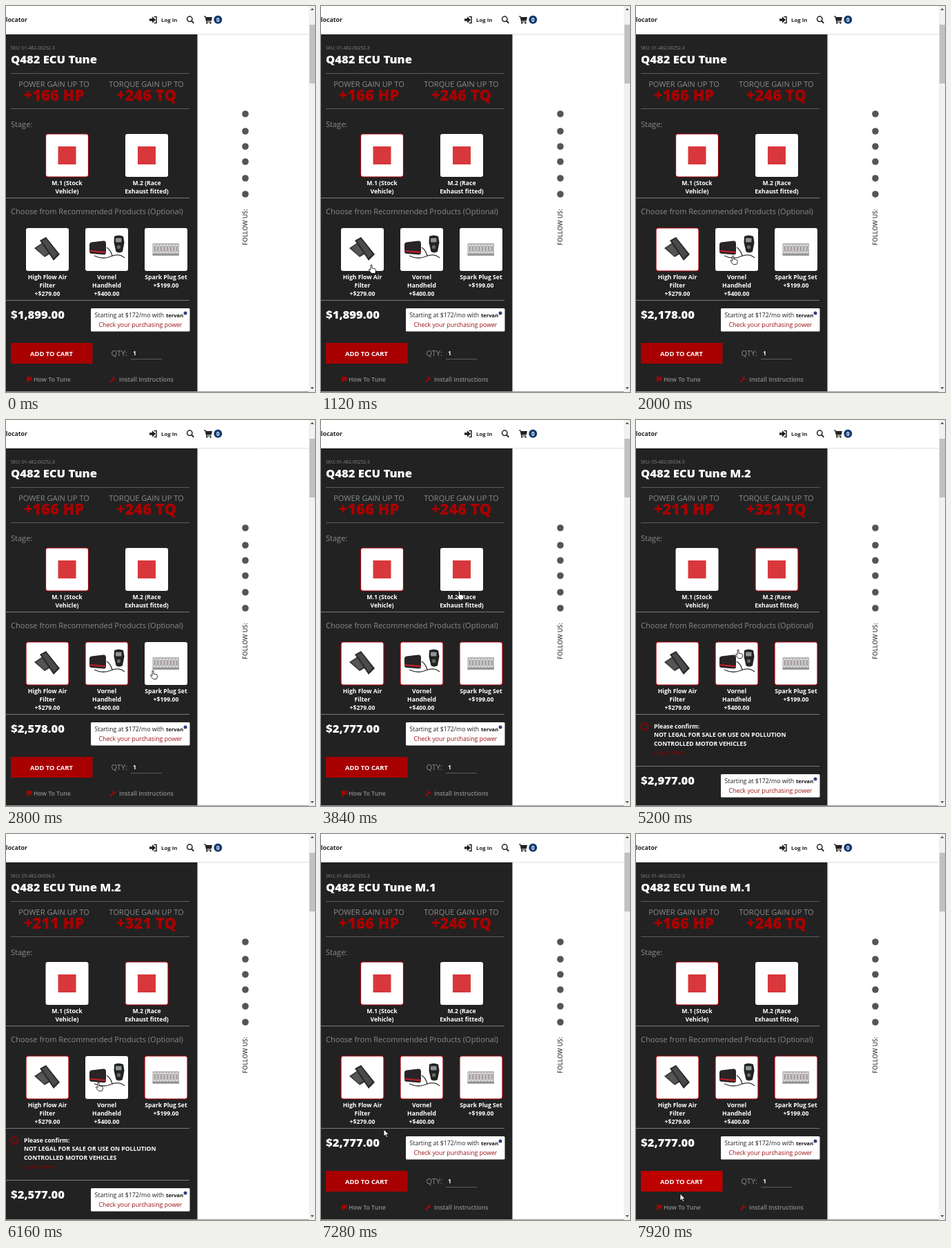
Recreate the animation shown at these times as an HTML page. Size 448 by 558 pixels, loop 8000 ms.

```html
<!DOCTYPE html>
<html lang="en">
<head>
<meta charset="utf-8">
<title>Tune configurator</title>
<style>
  html, body { margin: 0; width: 100%; height: 100%; overflow: hidden; background: #fff; }
  svg { display: block; width: 448px; height: 558px; font-family: "Open Sans", sans-serif; }
  .b { font-weight: 700; font-size: 8.65px; fill: #fff; }
  .h { font-weight: 800; font-size: 16.6px; fill: #fff; }
  .g { font-size: 11.05px; fill: #8b8b8b; }
  .big { font-weight: 800; font-size: 22px; fill: #a80000; }
  .s { font-weight: 600; font-size: 8.75px; fill: #8b8b8b; }
  .pay { font-size: 8.75px; fill: #222; }
  .m { text-anchor: middle; }
  .rule { fill: #5c5c5c; }
  .edge { fill: #7a7a7a; }
  .tile { fill: #fff; stroke-width: 1.2; }
</style>
</head>
<body>
<svg viewBox="0 0 448 558" xmlns="http://www.w3.org/2000/svg">
  <defs>
    <clipPath id="clip"><rect y="41" width="277.500" height="516"/></clipPath>
    <linearGradient id="shade" x2="0" y2="1">
      <stop stop-color="#e6e6e6"/><stop offset="1" stop-color="#fff"/>
    </linearGradient>
  </defs>
  <rect width="448" height="558" fill="#fff"/>
  <rect x="277" y="40" width="162" height="3" fill="url(#shade)"/>

  <g fill="#222">
    <text x="31" y="22.500" text-anchor="end" font-size="8.800" font-weight="700">Dealer locator</text>
    <text x="225" y="22.500" font-size="7.800" font-weight="700">Log In</text>
    <path d="M208 18.200h4v-3l5 4.800-5 4.800v-3h-4z"/>
    <path d="M214.500 15.500h3.500v9h-3.500" fill="none" stroke="#222" stroke-width="1.500"/>
    <circle cx="266.300" cy="18.800" r="3.700" fill="none" stroke="#222" stroke-width="1.500"/>
    <path d="M269 21.500l3.300 3.300" stroke="#222" stroke-width="1.800"/>
    <path d="M287 14.500h2.600l.4 1.500h9l-1.200 5.500h-6.500l.2 1h6v1h-7.200l-1.700-7.800h-1.600z"/>
    <circle cx="291.300" cy="24.600" r="1.200"/><circle cx="296.500" cy="24.600" r="1.200"/>
    <circle cx="307.300" cy="19.800" r="6" fill="#123a72"/>
    <text class="m" x="307.300" y="22.800" font-size="8" font-weight="700" style="fill:#fff">0</text>
  </g>

  <g clip-path="url(#clip)">
    <rect y="41" width="278" height="516" fill="#222"/>
    <text id="sku" x="7" y="62.500" font-size="6.600" fill="#858585"></text>
    <text id="title" class="h" x="7" y="82.700"></text>
    <rect class="rule" x="7" y="97" width="259" height="1"/>
    <text class="g m" x="69.500" y="116.500">POWER GAIN UP TO</text>
    <text class="g m" x="203.500" y="116.500">TORQUE GAIN UP TO</text>
    <text id="hp" class="big m" x="69.500" y="136.800"></text>
    <text id="tq" class="big m" x="203.500" y="136.800"></text>
    <rect class="rule" x="7" y="148" width="259" height="1"/>
    <text class="g" x="7" y="175">Stage:</text>
    <rect class="edge" y="277" width="266" height="1"/>
    <text class="g" x="7" y="301">Choose from Recommended Products (Optional)</text>
    <g id="tiles"></g>

    <g id="photos">
      <path d="M41 350l12-8 13 15-10 6z" fill="#383838"/>
      <path d="M44 350l9-6 10 12-8 5z" fill="#555"/>
      <path d="M49 339l9-5 20 25-9 9z" fill="#2a2a2a"/>
      <path d="M52 339.500l6-3 17 22-6 6z" fill="#4a4a4a"/>
      <path d="M121 345q0-3 3-3.500l17-2q4-.3 4 4v13q0 3-3 3l-18-1.500q-3-.3-3-3z" fill="#292426"/>
      <path d="M121 353l24 2v2.500l-24-2.500z" fill="#b91f2a"/>
      <path d="M128 361q12 6 24 1t20 2M146 349q6 4 8 12" fill="none" stroke="#333" stroke-width="1.300"/>
      <path d="M157 333q6-3 13 0l1.500 9-2.500 13q-5 3-9.500 0l-3-13z" fill="#222"/>
      <rect x="159" y="335.500" width="8.500" height="6" rx="1" fill="#8d9596"/>
      <circle cx="163.500" cy="348.500" r="2.700" fill="#666"/>
      <rect x="212.500" y="343" width="38.500" height="18" rx="1" fill="#b4b4b4"/>
      <rect x="212.500" y="358.500" width="38.500" height="2" fill="#8c8c8c"/>
      <g id="plugs"></g>
    </g>

    <rect class="edge" y="425" width="266" height="1"/>
    <g id="confirm">
      <circle cx="12.300" cy="443.200" r="5" fill="none" stroke="#920000" stroke-width="2"/>
      <text class="b" x="26" y="446">Please confirm:</text>
      <text class="b" x="26" y="458.300">NOT LEGAL FOR SALE OR USE ON POLLUTION</text>
      <text class="b" x="26" y="470.500">CONTROLLED MOTOR VEHICLES</text>
      <text x="26" y="483.500" font-size="8" font-weight="600" fill="#720808">Learn More</text>
      <rect class="edge" y="500" width="266" height="1"/>
    </g>

    <g id="buy">
      <text id="price" class="h" x="7" y="451.700"></text>
      <rect x="123" y="437" width="143.500" height="33.500" rx="1.500" fill="#fff"/>
      <text class="pay" x="128.500" y="450">Starting at $172/mo with</text>
      <text x="232" y="450" font-size="7.600" font-weight="700" fill="#111">tervan</text>
      <circle cx="260" cy="444" r="2.500" fill="#2f3f7d"/>
      <text class="pay m" x="195" y="463.500" style="fill:#9c1212">Check your purchasing power</text>
      <rect id="add" x="7" y="487" width="118.500" height="30"/>
      <text class="m" x="66" y="505.500" font-size="9.350" font-weight="700" fill="#fff">ADD TO CART</text>
      <text class="g" x="152.500" y="506">QTY:</text>
      <text class="b" x="184" y="505">1</text>
      <rect class="rule" x="181" y="510" width="45" height="1"/>
      <path d="M30 536h7.500v5.500h-5v2H30z" fill="#9c0808"/>
      <text class="s" x="40" y="543">How To Tune</text>
      <path d="M152 543l4-4" stroke="#9c0808" stroke-width="2" stroke-linecap="round"/>
      <path d="M157.500 535.500a2.500 2.500 0 1 0 2 2.500l-2 .7-1-1z" fill="#9c0808"/>
      <text class="s" x="164" y="543">Install Instructions</text>
    </g>
  </g>
  <rect y="557" width="439" height="1" fill="#999"/>

  <g id="social" fill="#555"></g>
  <text transform="translate(349.500 346) rotate(-90)" font-size="8.900" font-weight="600" fill="#444">FOLLOW US:</text>

  <rect x="439" width="9" height="558" fill="#f1f1f1"/>
  <rect x="440" y="27" width="8" height="85" fill="#c1c1c1"/>
  <path d="M441.500 6l2.500-3 2.500 3zM441.500 551l2.500 3 2.500-3z" fill="#505050"/>

  <g id="cursor" fill="#fff" stroke="#000" stroke-width=".8" stroke-linejoin="round">
    <path id="arrow" d="M0 0v10l2.300-2.100 1.700 3.900 1.700-.8-1.700-3.700h3.200z"/>
    <path id="hand" d="M-1 1q0-1 1-1t1 1v4l4 .8q1.500.4 1.400 2L6 11.500q-.2 1-1.200 1H.7q-.7 0-1.100-.6L-3.300 8q-.7-1.200.3-1.500.8-.2 2 1.200z"/>
  </g>
</svg>
<script>
  const $ = id => document.getElementById(id);
  const LOOP = 8000, STEP = 80;

  // [left, top, label lines, first baseline]
  const tiles = [
    [57.5, 185, ["M.1 (Stock", "Vehicle)"], 259],
    [173, 185, ["M.2 (Race", "Exhaust fitted)"], 259],
    [29, 321, ["High Flow Air", "Filter", "+$279.00"], 395],
    [115, 321, ["Vornel", "Handheld", "+$400.00"], 395],
    [201, 321, ["Spark Plug Set", "+$199.00"], 395]
  ];
  $("tiles").innerHTML = tiles.map(([x, y, lines, base], i) =>
    `<rect id="tile${i}" class="tile" x="${x}" y="${y}" width="62" height="62" rx="3"/>` +
    (i < 2 ? `<rect x="${x + 18}" y="${y + 18}" width="26" height="26" fill="#d8383c"/>` : "") +
    lines.map((s, n) =>
      `<text class="b m" x="${x + 31}" y="${base + n * 12.2}">${s}</text>`).join("")
  ).join("");

  $("plugs").innerHTML = Array.from({ length: 8 }, (_, i) =>
    `<rect x="${214 + i * 4.6}" y="345" width="3.200" height="12" fill="#dedede"/>` +
    `<rect x="${215 + i * 4.6}" y="347" width="1.300" height="8" fill="#8a7878"/>`).join("");

  $("social").innerHTML = [156, 181, 203, 225, 249, 272].map(y =>
    `<circle cx="347" cy="${y}" r="4.800"/>`).join("");

  // cursor tip: [time, x, y]
  const path = [
    [0, -14, 300], [80, -14, 300], [560, 44, 354], [720, 48, 357], [800, 48, 357],
    [1120, 73, 374], [1600, 73, 374], [2080, 146, 360], [2320, 146, 360],
    [2800, 213, 362], [3200, 213, 362], [4000, 199, 234], [4640, 199, 234],
    [5440, 134, 359], [6320, 134, 359], [6720, 92, 222], [6880, 92, 222],
    [7280, 91, 427], [7520, 78, 503], [7600, 78, 503], [7920, 64, 520]
  ];
  // [time, stage, filter, handheld, plugs]
  const picks = [
    [0, 1, 0, 0, 0], [1600, 1, 1, 0, 0], [2320, 1, 1, 1, 0], [3200, 1, 1, 1, 1],
    [4080, 2, 1, 1, 1], [5600, 2, 1, 0, 1], [6320, 2, 1, 1, 1], [6800, 1, 1, 1, 1]
  ];
  const stages = {
    1: { sku: "01-482-00252-3", hp: 166, tq: 246, cost: 1899 },
    2: { sku: "05-482-00034-5", hp: 211, tq: 321, cost: 2099 }
  };

  const last = (rows, t) => rows.findLast(r => r[0] <= t);
  const put = (id, s) => { if ($(id).textContent !== s) $(id).textContent = s; };
  const ease = u => u * u * (3 - 2 * u);

  function tip(t) {
    const a = last(path, t), b = path[path.indexOf(a) + 1] || a;
    const u = a === b ? 0 : ease((t - a[0]) / (b[0] - a[0]));
    return [a[1] + (b[1] - a[1]) * u, a[2] + (b[2] - a[2]) * u];
  }

  const inside = (x, y, l, t, w, h) => x >= l && x <= l + w && y >= t && y <= t + h;

  function draw(t) {
    const [, stage, filter, handheld, plugs] = last(picks, t);
    const s = stages[stage];
    const cost = s.cost + 279 * filter + 400 * handheld + 199 * plugs;
    const suffix = t >= 6800 ? " M.1" : stage === 2 ? " M.2" : "";
    put("sku", "SKU: " + s.sku);
    put("title", "Q482 ECU Tune" + suffix);
    put("hp", `+${s.hp} HP`);
    put("tq", `+${s.tq} TQ`);
    put("price", `$${cost.toLocaleString("en-US")}.00`);
    [stage === 1, stage === 2, filter, handheld, plugs].forEach((on, i) =>
      $("tile" + i).setAttribute("stroke", on ? "#a80008" : "none"));
    $("confirm").style.display = stage === 2 ? "" : "none";
    $("buy").setAttribute("transform", `translate(0 ${stage === 2 ? 75 : 0})`);

    const [x, y] = tip(t);
    const overAdd = stage === 1 && inside(x, y, 7, 487, 118, 30);
    const hand = overAdd || tiles.some(([l, top]) => inside(x, y, l, top, 62, 86));
    $("add").setAttribute("fill", overAdd || t >= 7600 ? "#bd0000" : "#a80000");
    $("cursor").setAttribute("transform", `translate(${x} ${y})`);
    $("hand").style.display = hand ? "" : "none";
    $("arrow").style.display = hand ? "none" : "";
  }

  const start = performance.now();
  function tick(now) {
    const t = Math.max(0, now - start) % LOOP;
    draw(Math.floor(t / STEP) * STEP);
    requestAnimationFrame(tick);
  }
  draw(0);
  requestAnimationFrame(tick);
</script>
</body>
</html>
```
